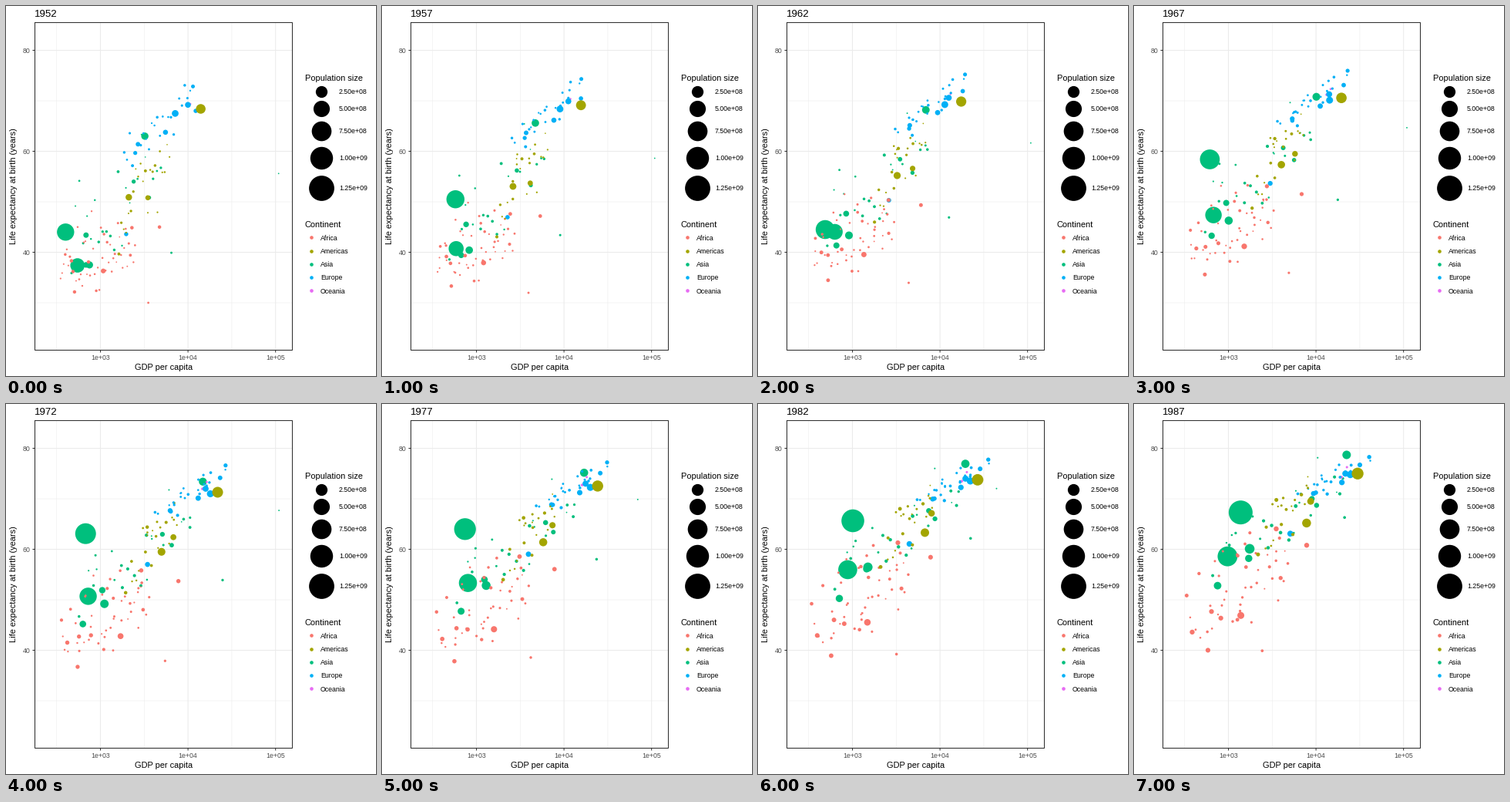
A matplotlib script for the animation above (8 s loop, 480 by 480 pixels).

```python
import numpy as np
import matplotlib.pyplot as plt
from matplotlib.animation import FuncAnimation

SIZE, DPI = 480, 100
STEPS = np.arange(8)
YEARS = 1952 + 5 * STEPS
COLORS = {"Africa": "#F8766D", "Americas": "#A3A500", "Asia": "#00BF7D",
          "Europe": "#00B0F6", "Oceania": "#E76BF3"}
GROWTH = {"Africa": 0.025, "Americas": 0.02, "Asia": 0.0195,
          "Europe": 0.007, "Oceania": 0.017}
DARK, GREY, GRID = "#333333", "#4D4D4D", "#EBEBEB"
LEFT, TOP, RIGHT, BOTTOM = 37.5, 21.5, 371.5, 446.5
rng = np.random.default_rng(7)


def map_x(log_income):
    return 122.5 + 113.6 * (np.asarray(log_income) - 3)


def map_y(life):
    return 57.5 + 6.55 * (80 - np.asarray(life))


def radius(millions):
    return 0.55 + 0.448 * np.sqrt(millions)


def area(r):
    """Marker area in points for a radius in pixels."""
    return (2 * np.asarray(r) * 72 / DPI) ** 2


xs, ys, areas, colors = [], [], [], []


def add(continent, pop, log_income, life, growth=None):
    """Add one dot; pop is in millions, as of 1970."""
    rate = GROWTH[continent] if growth is None else growth
    xs.append(map_x(log_income))
    ys.append(map_y(life))
    areas.append(area(radius(pop * np.exp(rate * (YEARS - 1970)))))
    colors.append(COLORS[continent])


def large(continent, pop, incomes, lives, at=(0, 4, 7), growth=None):
    """A dot that moves through a few key points."""
    add(continent, pop, np.interp(STEPS, at, np.log10(incomes)),
        np.interp(STEPS, at, lives), growth)


def cloud(continent, count, pop, pop_spread, income, spread, life, slope,
          scatter, bend=1.0):
    """Small dots around a rising trend; pairs are first and last values."""
    rank = rng.permutation(np.linspace(-1.7, 1.7, count))
    pops = np.minimum(pop * np.exp(pop_spread * rng.normal(size=count)), 45)
    u = (STEPS / STEPS[-1]) ** bend

    def blend(pair):
        return pair[0] + (pair[1] - pair[0]) * u

    for z, millions in zip(rank, pops):
        drift, first, last = rng.normal(size=3)
        log_income = blend(income) + blend(spread) * z + 0.1 * drift * u
        noise = blend((first, 0.75 * first + 0.6 * last)) * blend(scatter)
        add(continent, millions, log_income,
            blend(life) + blend(slope) * z + noise)


large("Asia", 800, (400, 576, 488, 613, 677, 741, 1379),
      (44, 50.5, 44.5, 58.4, 63.1, 64, 67.3), at=(0, 1, 2, 3, 4, 5, 7))
large("Asia", 545, (547, 724, 977), (37.4, 50.7, 58.6))
large("Asia", 118, (750, 1111, 1748), (37.5, 49.2, 60.1))
large("Asia", 68, (684, 630, 752), (37.5, 45.2, 52.8))
large("Asia", 62, (685, 1050, 1705), (43.4, 51.9, 58.2))
large("Asia", 104, (3217, 14779, 22376), (63, 73.4, 78.7), growth=0.01)
large("Asia", 6, (6460, 24837, 21198), (39.9, 53.9, 66.3))
large("Asia", 0.7, (108382, 109348, 28118), (55.6, 67.7, 74.2))
cloud("Asia", 24, 9, 1.2, (3.18, 3.67), (0.30, 0.43), (47, 65.5),
      (4.5, 5), (6, 4))

cloud("Oceania", 2, 6, 0.5, (4.01, 4.3), (0.01, 0.02), (69.2, 75.3),
      (0.1, 0.6), (0.1, 0.2))

large("Europe", 78, (7144, 18016, 24639), (67.5, 71, 74.8), growth=0.004)
large("Europe", 56, (9980, 15895, 21665), (69.2, 72, 75), growth=0.004)
large("Europe", 36, (1969, 3451, 5089), (43.6, 57, 63.1), growth=0.024)
cloud("Europe", 27, 8, 1.0, (3.68, 4.2), (0.24, 0.21), (65.2, 74),
      (3.6, 1.9), (2.4, 1.1), bend=0.7)

large("Africa", 51, (1077, 1698, 1385), (36.3, 42.8, 46.9))
large("Africa", 22.8, (4725, 7766, 7826), (45, 53.7, 60.8))
large("Africa", 5.7, (3521, 5473, 2430), (30, 37.9, 39.9))
cloud("Africa", 49, 4, 1.1, (2.97, 3.14), (0.25, 0.32), (39, 53),
      (1.8, 4.6), (3.8, 4.4))

large("Americas", 96, (2109, 4986, 7807), (50.9, 59.5, 65.2))
large("Americas", 53, (3478, 6809, 8688), (50.8, 62.4, 69.5))
cloud("Americas", 22, 4.5, 0.8, (3.5, 3.7), (0.17, 0.17), (53, 68),
      (4.5, 3.8), (6, 3), bend=0.9)
large("Americas", 203, (13990, 21806, 29884), (68.4, 71.3, 75),
      growth=0.0125)
xs, ys, areas = np.array(xs), np.array(ys), np.array(areas)

plt.rcParams["font.family"] = "Liberation Sans"
fig = plt.figure(figsize=(SIZE / DPI, SIZE / DPI), dpi=DPI, facecolor="white")
ax = fig.add_axes([0, 0, 1, 1])
ax.set_xlim(0, SIZE)
ax.set_ylim(SIZE, 0)
ax.axis("off")


def line(x, y, color, width=1.07, z=1):
    ax.plot(x, y, color=color, lw=width * 72 / DPI, zorder=z, snap=False,
            solid_capstyle="butt", solid_joinstyle="miter")


def label(x, y, text, size, color="black", **kw):
    return ax.text(x, y, text, fontsize=size * 72 / DPI, color=color, **kw)


# Grid, ticks and frame
for life in (70, 50, 30):
    line([LEFT, RIGHT], [map_y(life)] * 2, GRID, 0.53)
for power in (2.5, 3.5, 4.5):
    line([map_x(power)] * 2, [TOP, BOTTOM], GRID, 0.53)
for life in (80, 60, 40):
    y = map_y(life)
    line([LEFT, RIGHT], [y, y], GRID)
    line([LEFT - 3, LEFT], [y, y], DARK)
    label(31.7, y + 3.2, str(life), 8.8, GREY, ha="right")
for power in (3, 4, 5):
    x = map_x(power)
    line([x, x], [TOP, BOTTOM], GRID)
    line([x, x], [BOTTOM, BOTTOM + 3], DARK)
    label(x, 459, f"1e+0{power}", 8.8, GREY, ha="center")
line([LEFT, RIGHT, RIGHT, LEFT, LEFT], [TOP, TOP, BOTTOM, BOTTOM, TOP],
     DARK, z=4)

title = label(37, 14, "1952", 13.2)
label(204.5, 472, "GDP per capita", 11, ha="center")
label(13, 234, "Life expectancy at birth (years)", 11, rotation=90,
      ha="center", va="baseline", rotation_mode="anchor")

# Legends
label(388, 97, "Population size", 11)
for millions, y in zip((250, 500, 750, 1000, 1250), (111, 133, 162, 197, 236)):
    ax.scatter(408.6, y - 0.4, s=area(radius(millions)), color="black",
               linewidths=0)
    label(432, y + 3.2, f"{millions * 1e6:.2e}", 8.8)
label(388, 287, "Continent", 11)
for i, (name, color) in enumerate(COLORS.items()):
    y = 300.3 + 17.28 * i
    ax.scatter(396.4, y, s=area(2.3), color=color, linewidths=0)
    label(408, y + 3.2, name, 8.8)

dots = ax.scatter(xs[:, 0], ys[:, 0], s=areas[:, 0], c=colors,
                  linewidths=0, zorder=3)


def draw(step):
    dots.set_offsets(np.column_stack([xs[:, step], ys[:, step]]))
    dots.set_sizes(areas[:, step])
    title.set_text(str(YEARS[step]))
    return dots, title


anim = FuncAnimation(fig, draw, frames=len(STEPS), interval=1000, repeat=True,
                     repeat_delay=0, blit=False)
plt.show()
```
